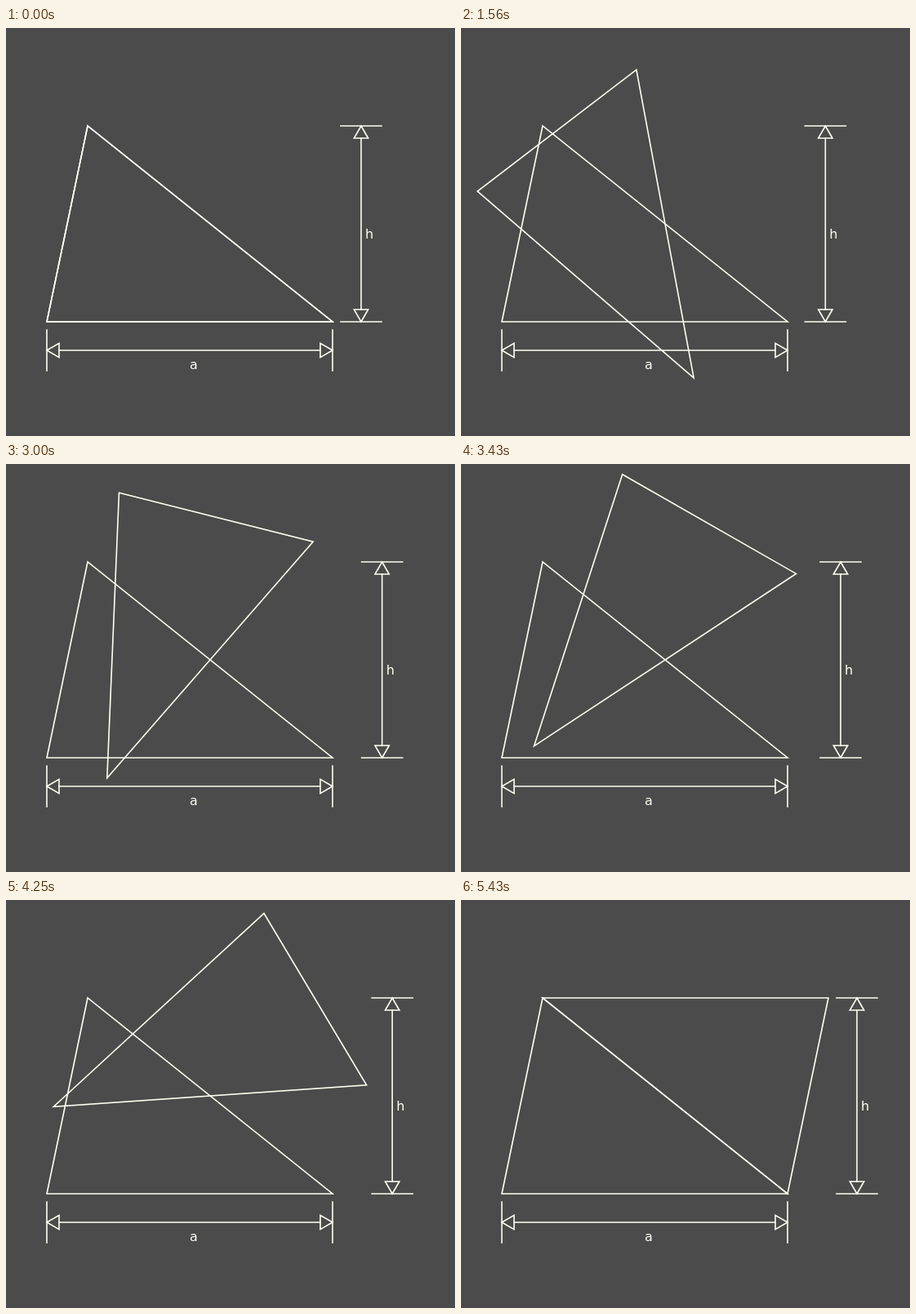
These frames come from a looping animation (550 by 500 pixels, 8000 ms). An HTML page with a canvas:

```html
<!DOCTYPE html>
<html lang="en">
<head>
<meta charset="utf-8">
<title>Area of a triangle</title>
<style>
  html, body { margin: 0; width: 100%; height: 100%; overflow: hidden; background: #4b4b4b; }
  canvas { display: block; }
</style>
</head>
<body>
<canvas id="stage" width="550" height="500"></canvas>
<script>
const ctx = document.getElementById('stage').getContext('2d');
const LOOP = 8000, START = 500, STEP = 62.5, STEPS = 80, TICKS = 300;
const PAPER = '#4b4b4b', INK = '#fffff2';
const TRIANGLE = [[50, 360], [400, 360], [100, 120]];
const PIVOT = [250, 240]; // midpoint of the shared side

function path(points, closed) {
  ctx.beginPath();
  points.forEach(([x, y]) => ctx.lineTo(x, y));
  if (closed) ctx.closePath();
  ctx.stroke();
}

// Dimension line along the x axis, with end ticks and open arrowheads.
function dimension(x, y, length, angle) {
  const head = 15, half = head * Math.tan(Math.PI / 6), tick = 25;
  ctx.save();
  ctx.translate(x, y);
  ctx.rotate(angle);
  path([[head, 0], [length - head, 0]]);
  for (const [end, dir] of [[0, 1], [length, -1]]) {
    path([[end, -tick], [end, tick]]);
    path([[end, 0], [end + dir * head, -half], [end + dir * head, half]], true);
  }
  ctx.restore();
}

function rotated([x, y], angle) {
  const dx = x - PIVOT[0], dy = y - PIVOT[1];
  const c = Math.cos(angle), s = Math.sin(angle);
  return [PIVOT[0] + dx * c - dy * s, PIVOT[1] + dx * s + dy * c];
}

// The picture updates 16 times a second on a 10 ms clock;
// the motion itself runs in sixtieths of a second.
function progress(t) {
  const clock = Math.floor(t / 10) * 10;
  const step = Math.floor((clock - START + 7.5) / STEP) + 1;
  const shown = Math.min(Math.max(step, 0), STEPS);
  return Math.round(shown * TICKS / STEPS) / TICKS;
}

function draw(t) {
  const p = progress(t);
  const heightX = 435 + 50 * p;

  ctx.fillStyle = PAPER;
  ctx.fillRect(0, 0, 550, 500);
  ctx.strokeStyle = ctx.fillStyle = INK;
  ctx.lineWidth = 1.6;
  ctx.lineCap = 'square';
  ctx.font = '16px "DejaVu Sans", sans-serif';

  path(TRIANGLE, true);
  path(TRIANGLE.map(v => rotated(v, Math.PI * p)), true);

  dimension(50, 395, 350, 0);
  dimension(heightX, 120, 240, Math.PI / 2);
  ctx.fillText('a', 225, 418);
  ctx.fillText('h', heightX + 5, 258);
}

let origin;
function tick(now) {
  origin ??= now;
  draw((now - origin) % LOOP);
  requestAnimationFrame(tick);
}
draw(0);
requestAnimationFrame(tick);
</script>
</body>
</html>
```
